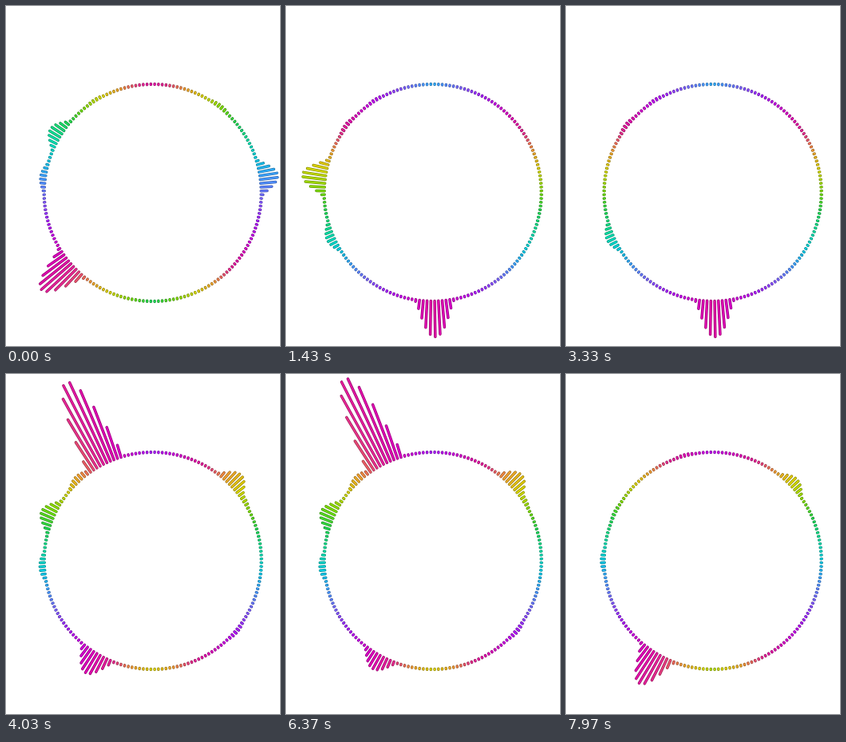
Recreate the animation shown at these times as an HTML page with a canvas. Size 343x426 px, loop 8000 ms.

```html
<!DOCTYPE html>
<html lang="en">
<head>
<meta charset="utf-8">
<title>Circular spectrum</title>
<style>
  html, body { margin: 0; width: 100%; height: 100%; overflow: hidden; background: #fff; }
  canvas { display: block; }
</style>
</head>
<body>
<canvas width="343" height="426"></canvas>
<script>
const ctx = document.querySelector('canvas').getContext('2d');
const LOOP = 8000, BEAT = 476, STEP = 100 / 3;
const CX = 183.7, CY = 234, RADIUS = 136, HALF_WIDTH = 12;

// Colour wheel in 30 degree steps
const WHEEL = '#e82a90 #f0a030 #d8d800 #80dc00 #20d850 #10e0a0 #00d0e0 #40a0ff #7868ff #a028ff #c800e8 #e000b8'
  .split(' ')
  .map(hex => [1, 3, 5].map(i => parseInt(hex.slice(i, i + 2), 16)));

const every = (period, first) => Array.from({ length: 17 / period + 1 }, (_, i) => first + i * period);

// Each chord: beats it peaks on, heights by angle left of the top, rise and fall in beats
const chord = (peaks, heights, rise = .4, fall = .45) =>
  ({ peaks, heights: Object.entries(heights), rise, fall });
const CHORDS = [
  chord(every(1, .33), { 26: 122 }, .14, .43),
  chord(every(4, 0), { 131: 50, 58: 16, 82: 7, 32: 3, '-82': 23, '-38': 4 }),
  chord(every(4, .6), { 149: 56, '-46': 15 }),
  chord(every(4, 2.9), { 181: 46, 114: 10, 52: 4, 32: 3 }, .4, .8),
  chord([5.25], { 181: 27, 114: 8, 64: 5, '-82': 4 }),
  chord([8.45, 13.35], { 66: 18, 93: 7, 42: 8, '-46': 20, '-55': 5, '-130': 4 }),
  chord([13.35], { 151: 20 }),
  chord([11.4, 16.7], { 90: 5, 64: 3, 15: 3 }),
  chord([1.2, 2.8, 9.6, 10.95, 14.9], { 82: 38 }),
  chord([5.1, 5.9, 7.6], { 82: 47 }, .4, .55),
  chord([12.85, 16.2], { 82: 30 })
];

const hump = x => Math.abs(x) < 1 ? (1 + Math.cos(Math.PI * x)) / 2 : 0;

function activeHumps(beat) {
  const humps = [];
  for (const { peaks, heights, rise, fall } of CHORDS) {
    const gain = Math.max(...peaks.map(peak => hump((beat - peak) / (beat < peak ? rise : fall))));
    if (gain > 0) {
      for (const [angle, height] of heights) humps.push({ angle: +angle, level: height * gain });
    }
  }
  return humps;
}

function wheelColor(phase, shade) {
  const p = ((phase % 360 + 360) % 360) / 30;
  const i = Math.floor(p), f = p - i;
  const a = WHEEL[i], b = WHEEL[(i + 1) % 12];
  return `rgb(${a.map((v, k) => Math.round((v + (b[k] - v) * f) * shade))})`;
}

function strokeBar(from, to, width, color) {
  ctx.lineWidth = width;
  ctx.strokeStyle = color;
  ctx.beginPath();
  ctx.moveTo(0, -from);
  ctx.lineTo(0, -to);
  ctx.stroke();
}

function draw(ms) {
  const humps = activeHumps(ms / BEAT);
  // The loudest hump is always magenta
  const lead = humps.reduce((a, b) => b.level > a.level ? b : a, { angle: 131, level: 0 });
  const top = 348 - 2.8 * Math.abs(lead.angle);

  ctx.fillStyle = '#fff';
  ctx.fillRect(0, 0, 343, 426);
  ctx.lineCap = 'round';
  for (let angle = -179; angle < 180; angle += 2) {
    let height = 0;
    for (const h of humps) {
      const d = (angle - h.angle + 540) % 360 - 180;
      height = Math.max(height, h.level * hump(d / HALF_WIDTH));
    }
    const phase = top + 2.8 * Math.abs(angle);
    const tip = RADIUS + Math.max(.5, height - 1.2);
    ctx.save();
    ctx.translate(CX, CY);
    ctx.rotate(-angle * Math.PI / 180);
    strokeBar(RADIUS - .5, tip, 3.5, wheelColor(phase, .68));
    strokeBar(RADIUS - .5, tip, 2, wheelColor(phase, 1));
    ctx.restore();
  }
}

function tick() {
  const ms = performance.now() % LOOP;
  draw(Math.floor(ms / STEP) * STEP);
  requestAnimationFrame(tick);
}
tick();
</script>
</body>
</html>
```
